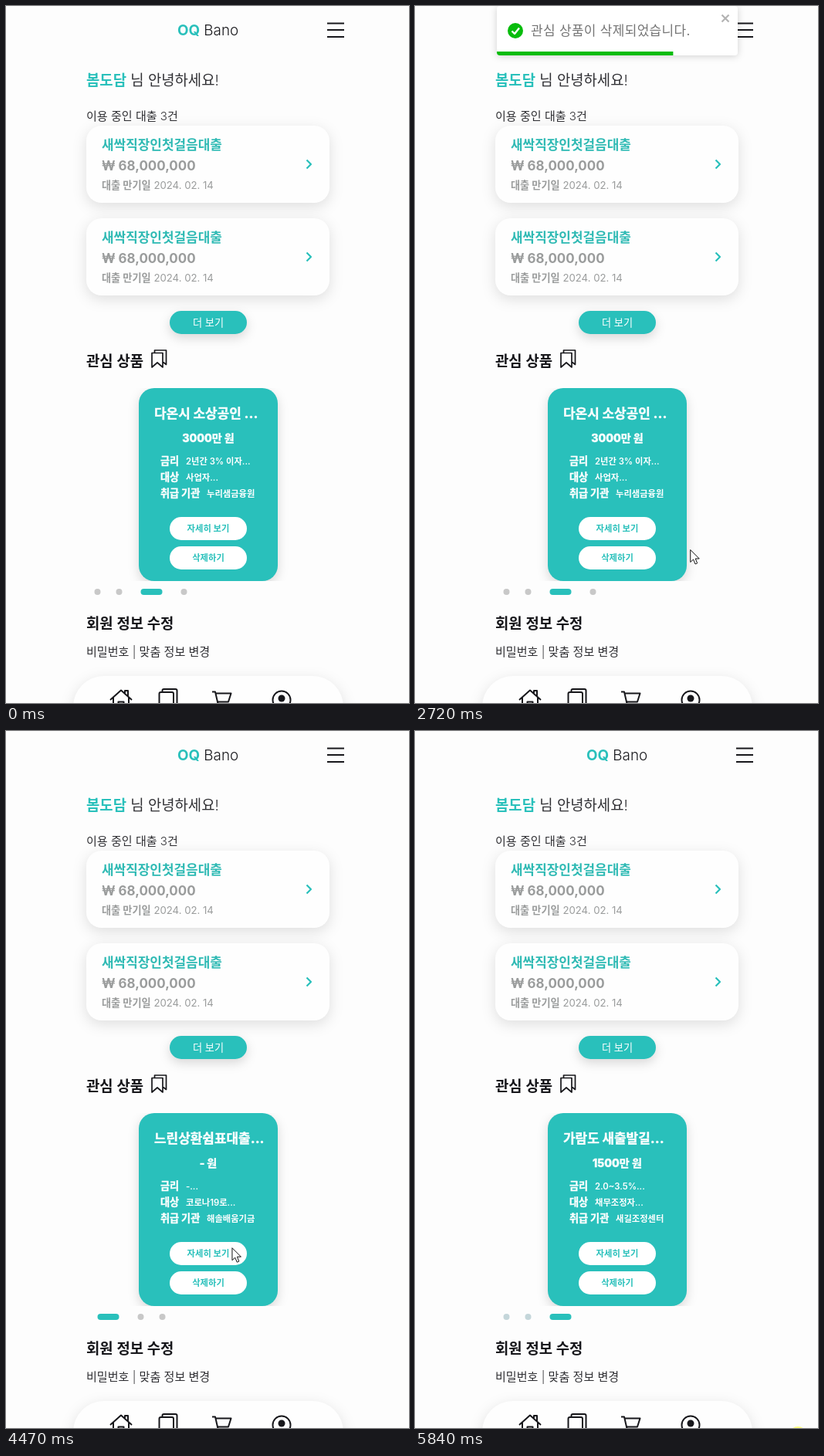
Animation, 522 px wide and 903 px high, one loop 5910 ms. Source, as an HTML page:

```html
<!DOCTYPE html>
<html lang="ko">
<head>
<meta charset="utf-8">
<title>Loan page</title>
<style>
  html, body { margin: 0; height: 100%; overflow: hidden; background: #fdfdfd; }
  svg { display: block; width: 100vw; height: 100vh; }
  text { font-family: Inter, "Noto Sans CJK KR", "Noto Sans CJK", sans-serif; user-select: none; }
  .box { fill: #fefefe; filter: drop-shadow(0 5px 9px rgba(0, 0, 0, .12)); }
  .soft { filter: drop-shadow(0 5px 7px rgba(0, 0, 0, .15)); }
  .line { fill: none; stroke: #17171b; stroke-width: 2; stroke-linejoin: round; }
  .heavy text[font-weight="800"] { stroke: #fff; stroke-width: .35; }
  .doodle { fill: none; stroke: #3f8cff; stroke-width: 6.5; stroke-linecap: round; stroke-linejoin: round; filter: blur(.8px); }
  .face { fill: none; stroke: #3d3d3d; stroke-width: 2.5; stroke-linecap: round; }
</style>
</head>
<body>
<svg id="stage" viewBox="0 0 522 903"></svg>
<script>
const LOOP = 5910;
const TEAL = '#29c0bb', INK = '#17171b', PALE_INK = '#303034', GREY = '#9a9c9c', DARK = '#444';
const LEFT = 104, PITCH = 315;

// y is the visual middle of the line
const text = (x, y, size, weight, fill, str, anchor = 'start') =>
  `<text x="${x}" y="${y + size * .355}" font-size="${size * .942}" font-weight="${weight}"
    fill="${fill}" text-anchor="${anchor}">${str}</text>`;
const rect = (x, y, w, h, r, fill, more = '') =>
  `<rect x="${x}" y="${y}" width="${w}" height="${h}" rx="${r}" fill="${fill}" ${more}/>`;
const oval = (x, y, rx, ry, fill, turn = 0) =>
  `<ellipse cx="${x}" cy="${y}" rx="${rx}" ry="${ry}" fill="${fill}" transform="rotate(${turn} ${x} ${y})"/>`;
const path = (d, cls, more = '') => `<path d="${d}" class="${cls}" ${more}/>`;
const group = (id, body, more = '') => `<g id="${id}" ${more}>${body}</g>`;

// ---- page ----
const header =
  text(261.5, 31, 20, 300, INK, `<tspan font-weight="700" fill="${TEAL}">OQ</tspan> Bano`, 'middle') +
  path('M416 22.5H438M416 31H438M416 40H438', 'line');

const loan = y =>
  `<rect class="box" x="104" y="${y}" width="315" height="100" rx="20"/>` +
  text(124, y + 25, 18, 700, '#2fbab4', '새싹직장인첫걸음대출') +
  text(124, y + 52, 18, 700, GREY, '₩ 68,000,000') +
  text(124, y + 77, 14, 400, GREY, '<tspan font-weight="700">대출 만기일</tspan> 2024. 02. 14') +
  path(`M389.5 ${y + 44.5}l5.5 5.5l-5.5 5.5`, 'line', `style="stroke:${TEAL};stroke-width:2.2"`);

const product = (x, [title, sum, rate, target, org], id = '') => `<g class="heavy" transform="translate(${x})">` +
  rect(0, 495, 180, 250, 20, TEAL, 'class="soft"') +
  text(20, 528, 18, 800, '#fff', title) +
  text(90, 560, 15, 800, '#fff', sum, 'middle') +
  [['금리', rate, 61], ['대상', target, 61], ['취급 기관', org, 88]].map(([name, value, vx], i) =>
    text(28, 589.5 + i * 21, 14, 800, '#fff', name) +
    text(vx, 590 + i * 21, 12, 600, '#fff', value)).join('') +
  rect(40, 662, 100, 30, 15, '#fff') + text(90, 677, 12, 600, TEAL, '자세히 보기', 'middle') +
  `<g class="${id}">` + rect(40, 700, 100, 30, 15, '#fff') +
  text(90, 715, 12, 600, TEAL, '삭제하기', 'middle') + '</g></g>';

const dots = (count, active, fill) => {
  let x = LEFT + .5, out = '';
  for (let i = 0; i < count; i++) {
    const on = i === active, gap = on ? 14 : 10, w = on ? 28 : 8;
    out += rect(x + gap, 755, w, 8, 4, on ? TEAL : fill);
    x += w + gap * 2;
  }
  return out;
};

const nav =
  `<rect class="box" x="87" y="868" width="350" height="90" rx="40"/>` +
  path('M135 899L149 886.5L163 899M139 896V910M159 896V910M154 890V887H158V894M145.500 910V901.500H152.500V910', 'line') +
  path('M202.500 889V887Q202.500 885 204.500 885H219.500Q221.500 885 221.500 887V910M198.500 910V891Q198.500 889 200.500 889H215Q217 889 217 891V910', 'line') +
  path('M267 888.500H271L275.500 908M272 890.500H291.500L288 901.500H274.500', 'line') +
  '<circle class="line" cx="357" cy="899" r="11.500"/>' +
  oval(357, 897, 4.5, 4.5, INK) + oval(357, 909, 8, 6, INK);

const page =
  text(LEFT, 96, 20, 300, PALE_INK, `<tspan font-weight="700" fill="${TEAL}">봄도담</tspan> 님 안녕하세요!`) +
  text(LEFT, 142, 16, 300, PALE_INK, '이용 중인 대출 3건') +
  loan(155) + loan(275) +
  rect(212, 395, 100, 30, 15, TEAL, 'class="soft"') +
  text(262, 410, 14, 400, '#fff', '더 보기', 'middle') +
  text(LEFT, 460, 20, 600, INK, '관심 상품') +
  path('M189 449.500H203V468L196 462L189 468ZM192.500 449V446H207.500V464.500L203 461', 'line', 'style="stroke-width:1.7"') +
  group('strip',
    group('before', product(172, ['다온시 소상공인 ...', '3000만 원', '2년간 3% 이자...', '사업자...', '누리샘금융원'], 'erase')) +
    group('after',
      product(172, ['느린상환쉼표대출...', '- 원', '-...', '코로나19로...', '해솔배움기금']) +
      product(172 - PITCH, ['가람도 새출발길...', '1500만 원', '2.0~3.5%...', '채무조정자...', '새길조정센터'])),
    'clip-path="url(#window)"') +
  group('dotsA', dots(4, 2, '#c8c8c8')) +
  group('dotsB', dots(3, 0, '#c8c8c8')) +
  group('dotsC', dots(3, 2, '#c4d6da')) +
  text(LEFT, 800, 20, 600, INK, '회원 정보 수정') +
  text(LEFT, 836, 16, 300, PALE_INK, '비밀번호 | 맞춤 정보 변경') +
  nav;

// ---- toast ----
const toast =
  rect(106, 0, 312, 64, 4, '#fff', 'style="filter:drop-shadow(0 1px 5px rgba(0,0,0,.18))"') +
  oval(130, 32, 10, 10, '#07bc0c') +
  path('M125.500 32.500L129 36L135 28.500', 'line', 'style="stroke:#fff;stroke-width:2.4"') +
  `<text x="150" y="38" font-size="17" letter-spacing=".3" fill="#757575">관심 상품이 삭제되었습니다.</text>` +
  path('M397.500 11.500L406.500 20.500M406.500 11.500L397.500 20.500', 'line', 'style="stroke:#b3b3b3;stroke-width:2.2"') +
  `<g clip-path="url(#toastEdge)"><rect id="bar" x="106" y="59" height="5" fill="#07bc0c"/></g>`;

// ---- loading screen ----
const mascot = ({ clip: [x, w], body: [cx, cy, r], feet, eyes, eye, pupils, pupil, cheeks, face, extra = '' }, i) =>
  `<clipPath id="m${i}"><rect x="${x}" y="400" width="${w}" height="190"/></clipPath><g clip-path="url(#m${i})">` +
  '<g class="soft">' + feet.map(f => oval(...f.slice(0, 4), DARK, f[4])).join('') +
  oval(cx, cy, r, r, TEAL) + '</g>' +
  eyes.map(e => oval(...e, ...eye, '#fff')).join('') +
  pupils.map(p => oval(...p, ...pupil, DARK)).join('') +
  cheeks.map(c => oval(...c, r / 8, r / 13, '#ffb9c4')).join('') +
  extra + path(face, 'face') + '</g>';

const mascots = [
  { clip: [95, 90], body: [137, 484, 58], feet: [[117, 546, 17, 9, -20], [164, 545, 16, 9, 35]],
    eyes: [[117, 460], [153, 460]], eye: [16.5, 20], pupils: [[121, 448], [154, 447]], pupil: [7, 9],
    cheeks: [[101, 485], [170, 483]], face: 'M148 518Q150 514 154 515Q154 520 149 520M149 525Q156 527 161 521' },
  { clip: [168, 113], body: [225, 486, 77], feet: [[199, 569, 20, 12, -25], [257, 566, 22, 14, 35]],
    eyes: [[198, 453], [247, 453]], eye: [21, 28], pupils: [[206, 455], [237, 454]], pupil: [9, 11],
    cheeks: [[178, 487], [267, 484]], face: 'M207 511Q228 527 243 504' },
  { clip: [272, 85], body: [313, 480, 57], feet: [[296, 545, 15, 10, -25], [340, 542, 16, 12, 35]],
    eyes: [[292, 456], [327, 456]], eye: [16, 20], pupils: [[299, 457], [321, 457]], pupil: [3, 4],
    cheeks: [[276, 482], [343, 479]],
    face: 'M291 432L308 443M331 432L315 443M306 433V437M311 433V437M299 510Q302 498 311 498Q320 498 323 510M307 509L306 515M312 509L315 515' },
  { clip: [360, 85], body: [402, 483, 56], feet: [[387, 550, 12, 17, 10], [423, 547, 11, 17, -30]],
    eyes: [[380, 459], [412, 459]], eye: [16, 20], pupils: [[381, 458], [411, 458]], pupil: [5, 7],
    cheeks: [[369, 482], [429, 482]],
    face: 'M367 438Q366 422 376 422Q382 423 385 433M401 432Q405 422 412 424Q418 426 420 433',
    extra: oval(397, 506, 11, 16, DARK, -25) + oval(402, 514, 7.5, 7, '#ffb9c4', -30) },
];

const petal = turn =>
  `<path d="M0 0Q18 -24 52 -14Q66 -6 52 6Q28 18 0 0Z" transform="translate(268 588) rotate(${turn}) scale(1.06)"/>`;
const loading =
  `<g class="doodle" style="stroke:#c9f0a4">${[57, 157, -30].map(petal).join('')}</g>` +
  '<g class="doodle">' +
  `<g transform="translate(192 329) rotate(14) scale(1.04)">
    <path d="M-46 24H-60V2L-50 -14Q-46 -32 -34 -32H12Q20 -32 26 -20L34 -4Q62 -4 62 10V22H52M-18 25H24"/>
    <path d="M-40 -4L-34 -21H-12V-4ZM-2 -4V-21H12L22 -4Z"/>
    <circle cx="-32" cy="26" r="11"/><circle cx="38" cy="26" r="11"/>
    <path d="M-12 -38Q-34 -50 -32 -36Q-26 -28 -12 -38Q10 -54 14 -40Q8 -30 -12 -38"/></g>` +
  `<g clip-path="url(#padEdge)"><path transform="translate(423.5 668) rotate(-14) scale(.93)"
    d="M-44 -30Q0 -20 44 -30A30 30 0 1 1 30 22H-30A30 30 0 1 1 -44 -30Z"/></g>
    <path d="M416 645Q410 625 428 618Q446 612 442 593M413 681L421 679M428 677L436 675"/>
    <path d="M366 684L399 677M379 664L386 697" stroke-width="11" stroke-linecap="butt" style="stroke-width:11"/>` +
  [[452, 663], [461, 648], [477, 656], [468, 672]].map(p => oval(...p, 3.5, 3.5, '#3f8cff')).join('') +
  `<ellipse cx="367" cy="775" rx="53" ry="18" transform="rotate(10 367 775)"/>
    <path d="M314 766L310 806Q318 826 362 836Q402 841 413 830L419 786"/>
    <path d="M313 803L326 784L338 826L356 796L376 834L394 798L409 828L417 797" style="stroke-width:5"/>
    <path d="M318 730L352 757M378 774L422 768" style="stroke-width:5"/>` +
  oval(352, 757, 5.5, 5.5, '#3f8cff') + oval(378, 774, 5.5, 5.5, '#3f8cff') + '</g>' +
  mascots.map(mascot).join('') +
  `<text x="269" y="394" font-size="60.300" font-weight="700" fill="#1a1a1d" text-anchor="middle">Loading !</text>`;

// ---- pointer ----
const arrow = '<path d="M.5 .5V16.500L4.300 13L6.800 19L9.400 17.900L7 12H12Z" fill="#fff" stroke="#111"/>';
const hand = `<path d="M-1.500 1.500Q0 -1 1.500 1.500V8Q4 6.500 4.700 8.500Q7 7.500 7.800 9.500Q10.800 9 10.800 12V17
  Q10.500 20 8.500 22V25H-1V22L-5.500 15Q-6.500 12 -3.500 12.500L-1.500 14.500Z" fill="#fff" stroke="#111" stroke-width="1.200"/>
  <path d="M1.500 8V12M4.700 8.500V12M7.800 9.500V13" fill="none" stroke="#111"/>`;

document.getElementById('stage').innerHTML = `<defs>
  <clipPath id="window"><rect x="${LEFT}" y="495" width="315" height="250"/></clipPath>
  <clipPath id="toastEdge"><rect x="106" y="0" width="312" height="64" rx="4"/></clipPath>
  <clipPath id="padEdge"><rect x="340" y="600" width="170" height="109"/></clipPath></defs>` +
  rect(0, 0, 522, 903, 0, '#fdfdfd') +
  group('header', header) + group('page', page) + group('toast', toast) + group('loading', loading) +
  '<circle id="press" r="12" fill="#ff0" opacity=".5"/>' +
  group('pointer', group('arrow', arrow) + group('hand', hand));

const $ = id => document.getElementById(id);
const show = (id, on) => { $(id).style.display = on ? '' : 'none'; };
const clamp = v => Math.min(1, Math.max(0, v));

// movement advances in even steps, like a screen capture
const STEP = 68.4, FIRST = 300;
const hold = t => FIRST + Math.floor((t - FIRST) / STEP) * STEP;

// time, x, y of the pointer tip
const trail = [
  [300, 467, 858], [440, 405, 740], [560, 330, 655], [650, 300, 628], [760, 262, 672], [840, 251, 712],
  [1540, 251, 712], [1800, 286, 710], [2100, 316, 704], [2720, 358, 704], [3170, 362, 704],
  [3400, 366, 706], [3650, 376, 721], [3950, 385, 731], [4140, 385, 731], [4350, 300, 680],
  [4600, 265, 630], [4680, 320, 625], [4746, 382, 622], [4900, 402, 615], [5050, 402, 640],
  [5300, 404, 720], [5570, 428, 906],
];
const tip = t => {
  const i = Math.max(1, trail.findIndex(k => k[0] > t));
  const [t0, x0, y0] = trail[i - 1], [t1, x1, y1] = trail[i];
  const p = clamp((t - t0) / (t1 - t0));
  return [x0 + (x1 - x0) * p, y0 + (y1 - y0) * p];
};

const GRAB = 4600, RELEASE = 4746, DRAG = 117;
const shiftAt = (t, x) => {
  if (t < GRAB) return 0;
  if (t < RELEASE) return x - 265;
  return PITCH - (PITCH - DRAG) * (1 - clamp((t - RELEASE) / 320)) ** 3;
};

const ease = 'cubic-bezier(.215,.61,.355,1)';
const bounce = $('toast').animate(
  [[0, -3000, 0], [.6, 25, 1], [.75, -10, 1], [.9, 5, 1], [1, 0, 1]].map(([offset, y, opacity]) =>
    ({ offset, opacity, transform: `translateY(${y}px)`, easing: ease })),
  { delay: 1190, duration: 700, fill: 'both' });
bounce.pause();

const [eraseBox, eraseText] = document.querySelector('.erase').children;

function draw(t) {
  const reloaded = t >= 3680, wait = t >= 2790 && t < 3400;
  const live = t < 2790 || reloaded;
  show('header', !wait);
  show('page', live);
  show('loading', wait);
  show('toast', t >= 1190 && t < 2790);
  show('before', !reloaded);
  show('after', reloaded);
  show('dotsA', !reloaded);
  show('dotsB', reloaded && t < 4670);
  show('dotsC', t >= 4670);

  const held = hold(t);
  bounce.currentTime = Math.max(0, held);
  $('bar').setAttribute('width', 312 * clamp(1 - (held - 1890) / 3000));

  const moving = t >= FIRST && t < 5570;
  const [x, y] = moving ? tip(held) : [0, 0];
  const inside = live && x > 212 && x < 312;
  const onErase = !reloaded && inside && y > 700 && y < 730;
  show('pointer', moving);
  show('hand', onErase);
  show('arrow', !onErase);
  $('pointer').setAttribute('transform', `translate(${x} ${y})`);
  eraseBox.setAttribute('fill', onErase ? '#c7c7cc' : '#fff');
  eraseText.setAttribute('fill', onErase ? '#fff' : TEAL);
  $('after').setAttribute('transform', `translate(${shiftAt(held, x)})`);

  const last = t >= 5840;
  show('press', last || (t >= 1140 && t < 1210));
  $('press').setAttribute('cx', last ? 496 : 251);
  $('press').setAttribute('cy', last ? 913 : 713);
}

const start = performance.now();
function tick() {
  draw((performance.now() - start) % LOOP);
  requestAnimationFrame(tick);
}
tick();
</script>
</body>
</html>
```
